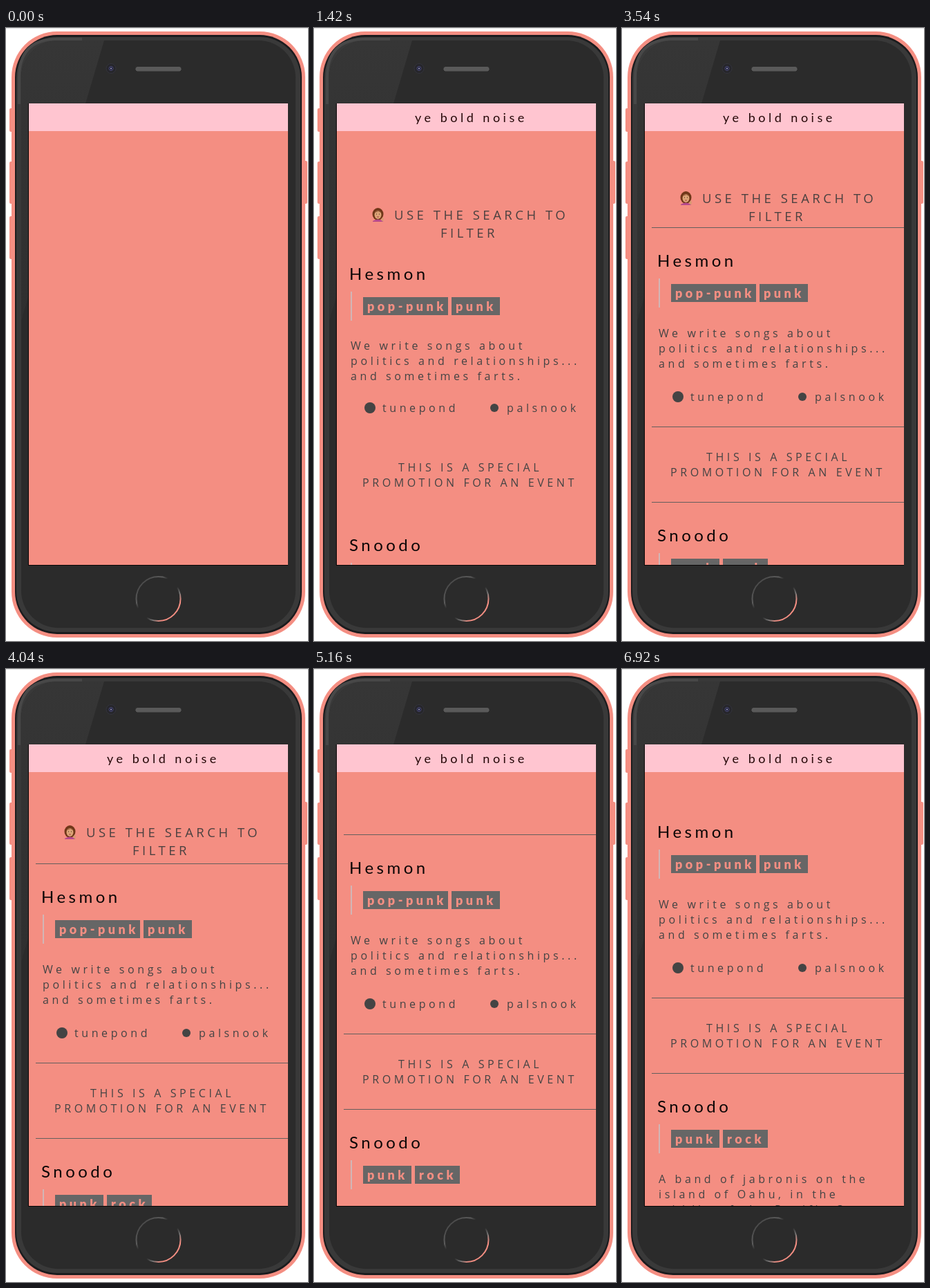
An HTML page for the animation above (7770 ms loop, 437x886 px).

```html
<!DOCTYPE html>
<html lang="en">
<head>
<meta charset="utf-8">
<title>Band list</title>
<style>
  html, body { margin: 0; width: 100%; height: 100%; overflow: hidden; background: #fff; }
  svg { display: block; width: 437px; height: 886px; }
  text { white-space: pre; letter-spacing: 4.6px; font: 16px "Open Sans", sans-serif; fill: #444; }
  .intro { font-size: 18.5px; letter-spacing: 4.5px; fill: #4a4140; }
  .brand { font: 18px Lato, sans-serif; letter-spacing: 4.5px; fill: #260808; }
  .band { font: 24px Lato, sans-serif; letter-spacing: 4.5px; fill: #0c0606; }
  .tag { font: 900 18px Lato, sans-serif; letter-spacing: 4.5px; fill: #f48e82; }
</style>
</head>
<body>
<svg viewBox="0 0 437 886">
  <defs>
    <clipPath id="page"><rect x="33" y="149" width="375" height="627"/></clipPath>
    <clipPath id="face"><rect x="22" y="18" width="397" height="849" rx="54"/></clipPath>
    <linearGradient id="ring" x1="0" y1="0" x2="1" y2="1">
      <stop offset=".15" stop-color="#4c4c4c"/>
      <stop offset=".3" stop-color="#5c5c5c"/>
      <stop offset=".38" stop-color="#2b2b2b"/>
      <stop offset=".58" stop-color="#2b2b2b"/>
      <stop offset=".68" stop-color="#777"/>
      <stop offset=".78" stop-color="#f48e82"/>
    </linearGradient>
    <linearGradient id="gloss" x1="0" y1="0" x2="0" y2="1">
      <stop offset="0" stop-color="#363636"/>
      <stop offset="1" stop-color="#2f2f2f"/>
    </linearGradient>
    <pattern id="mesh" width="2" height="2" patternUnits="userSpaceOnUse">
      <rect width="2" height="2" fill="#444"/>
      <path d="M0 0h1v1h-1zM1 1h1v1h-1z" fill="#707070"/>
    </pattern>
  </defs>

  <rect width="437" height="1" fill="#e4e4e4"/>
  <g fill="#f48e82">
    <rect x="5" y="116" width="6" height="34" rx="2"/>
    <rect x="5" y="193" width="6" height="61" rx="2"/>
    <rect x="5" y="272" width="6" height="62" rx="2"/>
    <rect x="430" y="192" width="6" height="62" rx="2"/>
    <rect x="8" y="5" width="425" height="876" rx="66"/>
  </g>
  <rect x="13" y="10" width="415" height="866" rx="61" fill="#1b1c1e"/>
  <rect x="15" y="13" width="411" height="860" rx="59" fill="#393939"/>
  <rect x="22" y="18" width="397" height="849" rx="54" fill="#2b2b2b"/>
  <path d="M142 18L22 423V18Z" fill="url(#gloss)" clip-path="url(#face)"/>
  <path d="M19 110V72Q19 16 74 16H110" fill="none" stroke="#484848" stroke-width="4"/>

  <circle cx="152" cy="58.5" r="7" fill="#26262b" stroke="#34343c"/>
  <circle cx="152" cy="58.5" r="3" fill="#22233f" stroke="#4a4a70"/>
  <circle cx="152" cy="58.5" r="1" fill="#a9a9c4"/>
  <rect x="187.5" y="56" width="66" height="6.5" rx="3.2" fill="url(#mesh)"/>
  <circle cx="220.5" cy="825" r="32" fill="none" stroke="url(#ring)" stroke-width="2"/>

  <rect x="32" y="109" width="376" height="668" fill="#080505"/>
  <rect x="33" y="109" width="375" height="667" fill="#f48e82"/>
  <rect x="33" y="109" width="375" height="40" fill="#ffc5d0"/>
  <text id="brand" class="brand" x="146" y="136">ye bold noise</text>
  <g id="content" clip-path="url(#page)"></g>
</svg>

<script>
const LOOP = 7770;
const PIVOT = 1277;      // the opening wobble shrinks towards this height
const HEADER_RATE = 1.5; // the intro scrolls away faster than the list
const content = document.getElementById("content");
const brand = document.getElementById("brand");
const items = [];

const clamp = v => Math.max(0, Math.min(1, v));
const line = (x, y, str, cls = "") => `<text x="${x}" y="${y}" class="${cls}">${str}</text>`;
const box = (x, y, w, h, fill) => `<rect x="${x}" y="${y}" width="${w}" height="${h}" fill="${fill}"/>`;
const tag = (x, w, str) => box(x, 0, w, 26, "#666") + line(x + 6, 20, str, "tag");
const lines = rows => rows.map((row, i) => line(53, i * 22, row)).join("");

function add(y, markup, kind = "list") {
  const el = document.createElementNS("http://www.w3.org/2000/svg", "g");
  el.innerHTML = markup;
  content.append(el);
  items.push({ el, y, kind });
}

function addBand(y, name, tags, about) {
  add(y, line(51, 0, name, "band"));
  add(y + 17, box(53, 0, 2, 42, "#d2b6b6"));
  add(y + 25, tags);
  add(y + 102, lines(about));
}

const rule = y => add(y, box(43, 0, 365, 1, "#645f5d"), "rule");

const woman = `
  <ellipse cx="92.5" cy="-8" rx="8" ry="9" fill="#703719"/>
  <path d="M85 2Q92-3 100 2V3H85Z" fill="#b5488c"/>
  <ellipse cx="92.5" cy="-7" rx="5" ry="6" fill="#dda477"/>
  <path d="M88-10Q93-15 97-10L93-12Z" fill="#703719"/>
  <path d="M90-8h1M94-8h1" stroke="#39211a"/>
  <path d="M91-4h3" stroke="#a53f3f"/>
  <path d="M97-1l3-3 1 4-2 3z" fill="#d89a72"/>`;

add(264, woman + line(116, 0, "USE THE SEARCH TO", "intro"), "header");
add(290, line(183, 0, "FILTER", "intro"), "header");
rule(295);
addBand(352, "Hesmon", tag(71, 123, "pop-punk") + tag(199, 70, "punk"),
  ["We write songs about", "politics and relationships...", "and sometimes farts."]);
add(546, `<circle cx="81" cy="-6" r="8" fill="#444"/><circle cx="261" cy="-6" r="6" fill="#444"/>`
  + line(99, 0, "tunepond") + line(279, 0, "palsnook"));
rule(583);
add(633, line(122, 0, "THIS IS A SPECIAL") + line(70, 22, "PROMOTION FOR AN EVENT"));
rule(692);
addBand(749, "Snoodo", tag(71, 70, "punk") + tag(146, 65, "rock"),
  ["A band of jabronis on the", "island of Oahu, in the", "middle of the Pacific Ocean"]);

// Smooth curve through [time, value] points.
function track(points, t) {
  const last = points.length - 1;
  if (t <= points[0][0]) return points[0][1];
  if (t >= points[last][0]) return points[last][1];
  const i = points.findIndex(p => p[0] > t) - 1;
  const slope = k => {
    if (k === 0 || k === last) return 0;
    const [a, b] = [points[k - 1], points[k + 1]];
    return (b[1] - a[1]) / (b[0] - a[0]);
  };
  const [[t0, v0], [t1, v1]] = [points[i], points[i + 1]];
  const d = t1 - t0, u = (t - t0) / d, w = 1 - u;
  return v0 * w * w * (1 + 2 * u) + v1 * u * u * (3 - 2 * u)
    + d * u * w * (slope(i) * w - slope(i + 1) * u);
}

const WOBBLE = [[90, -.028], [420, .024], [900, -.0175], [1410, .0128], [1850, -.008], [2300, 0]];
const SCROLL = [[2300, 0], [3200, -4], [3540, -7], [3980, -12.7], [4500, -25], [4760, -33],
  [5840, -94], [6200, -103], [6540, -106.5], [6920, -108]];

function render(t) {
  const wobble = track(WOBBLE, t), scroll = track(SCROLL, t);
  const fade = clamp((t - 60) / 450);
  brand.setAttribute("opacity", fade);
  content.setAttribute("opacity", fade);
  for (const { el, y, kind } of items) {
    const rate = kind === "header" ? HEADER_RATE : 1;
    const top = Math.round(y + wobble * (PIVOT - y) + scroll * rate);
    el.setAttribute("transform", `translate(0 ${top})`);
    if (kind === "header") el.setAttribute("opacity", clamp((scroll + 37) / 16));
    if (kind === "rule") el.setAttribute("opacity", top < 192 ? 0 : clamp((t - 1650) / 350));
  }
}

const start = performance.now();
function tick() {
  render((performance.now() - start) % LOOP);
  requestAnimationFrame(tick);
}
tick();
</script>
</body>
</html>
```
